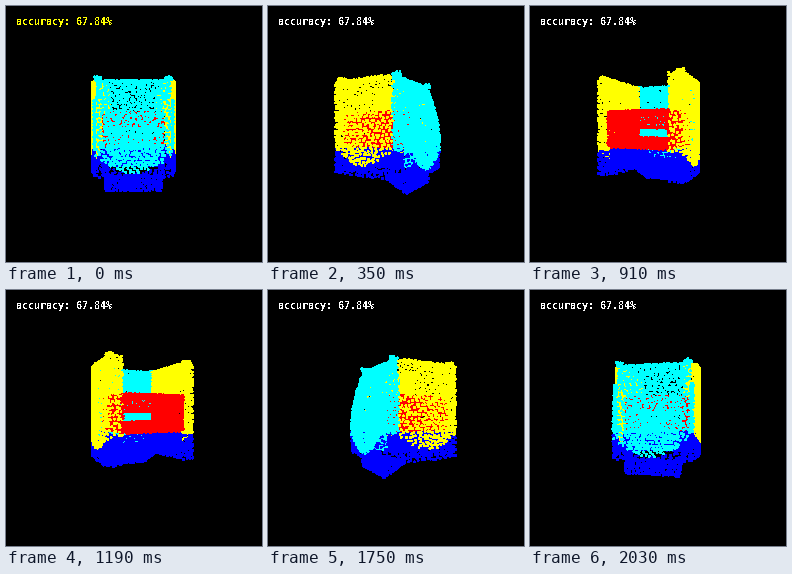
Write a matplotlib script that moves like this. It is 256 by 256 pixels and loops after 2100 ms.

```python
import numpy as np
import matplotlib.pyplot as plt
from matplotlib.animation import FuncAnimation

SIZE, DPI = 256, 100
FRAMES, STEP = 30, 70
CX, CY, DIST = 127.5, 121.5, 225    # projection centre and camera distance
SPACING, DOT = 3.0, 2.0             # gap between points, dot diameter in px
YELLOW, CYAN, RED, BLUE = range(4)
PALETTE = np.array([[1, 1, 0], [0, 1, 1], [1, 0, 0], [0, 0, 1]])

rng = np.random.default_rng(4)
parts = []


def spread(w, h, gap):
    """Loosely even (u, v) pairs for a sheet of w by h: a shaken brick grid."""
    cols, rows = max(2, round(w / gap)), max(2, round(h / gap))
    i, j = np.meshgrid(np.arange(cols), np.arange(rows))
    u = (i + 0.25 + 0.5 * (j % 2)) / cols
    v = (j + 0.5) / rows
    u = u + rng.uniform(-0.33, 0.33, u.shape) / cols
    v = v + rng.uniform(-0.33, 0.33, v.shape) / rows
    return u.ravel().clip(0, 1), v.ravel().clip(0, 1)


def add(x, y, z, tone):
    parts.append(np.stack(np.broadcast_arrays(x, y, z, tone), axis=1))


def lerp(a, b, t):
    return a + (b - a) * t


def rect(x, y, z, tone, gap=SPACING):
    """Flat sheet; two of x, y, z are ranges, the third one is fixed."""
    spans = [abs(r[1] - r[0]) for r in (x, y, z) if np.ndim(r)]
    uv = iter(spread(*spans, gap))
    add(*[lerp(r[0], r[1], next(uv)) if np.ndim(r) else r
          for r in (x, y, z)], tone)


def rear(y):
    return np.interp(y, [-43, -28, -10, 10, 43], [21, 27, 32, 35, 34])


def flank(z):
    return np.interp(z, [-43, -10, 5, 20, 36], [39.5, 41.5, 40.5, 36, 32.5])


TOP, FLOOR, FRONT, INNER, SEAT = -43, 43, -42.5, 28, -44

for side in (-1, 1):
    # outer wall, wrapping from arm to back
    u, v = spread(74, 86, SPACING)
    y = lerp(TOP, FLOOR, v)
    z = lerp(FRONT, rear(y), u)
    x = flank(z) - 4 * (z > 15) * (y < -25) * (z - 15) / 6
    edge = 20 + 13 * np.sin(np.pi * np.clip((z - FRONT) / 62, 0, 1))
    tone = np.where(y > edge, BLUE, np.where(z > 18, CYAN, YELLOW))
    add(side * x, y, z, tone)

    # arm: inner wall, front, top
    rect(side * INNER, (TOP, -14), (-41, 13), YELLOW)
    rect((side * INNER, side * 39.5), (TOP, 20), FRONT, YELLOW)
    rect((side * INNER, side * 39.5), TOP, (FRONT, 15), YELLOW)
    rect((side * INNER, side * 39.5), (20, FLOOR), FRONT, BLUE)
    rect(side * INNER, (20, FLOOR), (-41, 20), BLUE)

    # seat flanks
    rect(side * INNER, (-14, 17), (SEAT, 13), RED, 2.4)

    # small ears on the top corners
    for ex, ez, tone in ((36.5, -37.2, YELLOW), (32.4, 20, CYAN)):
        t = rng.uniform(0, 2 * np.pi, 26)
        r = 3.4 * np.sqrt(rng.random(26))
        add(side * ex + r * np.cos(t), rng.uniform(-46, -43, 26),
            ez + r * np.sin(t), tone)

    # flank of the wedge below the back
    u, v = spread(20, 14, SPACING)
    z = lerp(5, 25, u)
    add(side * 25, lerp(43, lerp(46, 57, u), v), z, BLUE)

# back shell
u, v = spread(66, 86, SPACING)
y = lerp(TOP, FLOOR, v)
half = np.interp(y, [-43, -10, 43], [32, 32.5, 32.5])
edge = 24 + 15 * np.sin(np.pi * u)
add(half * (2 * u - 1), y, rear(y), np.where(y > edge, BLUE, CYAN))

# inner back with its frame
rect((-INNER, INNER), (TOP, 18), 13, CYAN)
rect((-30, 30), TOP, (13, 21), CYAN)
rect((-23, 23), (1, 35), 22, CYAN, 3.2)
t = np.linspace(-1, 1, 46)
for level in (1, 17):
    add(23.5 * t, level + 2.5 * t**8, 26, CYAN)

# seat cushion and the slab under it
for level in (-14, 0, 11, 17):
    rect((-INNER, INNER), level, (SEAT, 13), RED)
rect((-INNER, INNER), (-14, 1), SEAT, RED, 2)
rect((-INNER, INNER), (11, 17), SEAT, RED, 2)

# base
rect((-INNER, INNER), (18, 35), -40, BLUE, 2.2)
rect((-INNER, INNER), 35, (-40, 20), BLUE)
rect((-25, 25), (43, 57), 25, BLUE)
u, v = spread(50, 23, SPACING)
add(lerp(-25, 25, u), lerp(46, 57, v), lerp(5, 25, v), BLUE)

X, Y, Z, TONE = np.concatenate(parts).T
COLORS = PALETTE[TONE.astype(int)]

fig = plt.figure(figsize=(SIZE / DPI, SIZE / DPI), dpi=DPI, facecolor="black")
ax = fig.add_axes([0, 0, 1, 1])
ax.set(xlim=(0, SIZE), ylim=(SIZE, 0))
ax.axis("off")
dots = ax.scatter(X, Y, s=(DOT * 72 / DPI) ** 2, linewidths=0,
                  antialiased=False)
label = ax.text(9.5, 19, "accuracy: 67.84%", family="DejaVu Sans Mono",
                weight="bold", size=7.2, va="baseline", antialiased=False)


def draw(i):
    angle = 2 * np.pi * i / FRAMES
    c, s = np.cos(angle), np.sin(angle)
    near = Z * c - X * s
    order = np.argsort(near)
    scale = DIST / (DIST - near)
    pos = np.column_stack([CX + (X * c + Z * s) * scale, CY + Y * scale])
    dots.set_offsets(pos[order])
    dots.set_facecolors(COLORS[order])
    label.set_color("yellow" if i == 0 else "white")
    return dots, label


anim = FuncAnimation(fig, draw, frames=FRAMES, interval=STEP,
                     repeat=True, repeat_delay=0)
plt.show()
```
